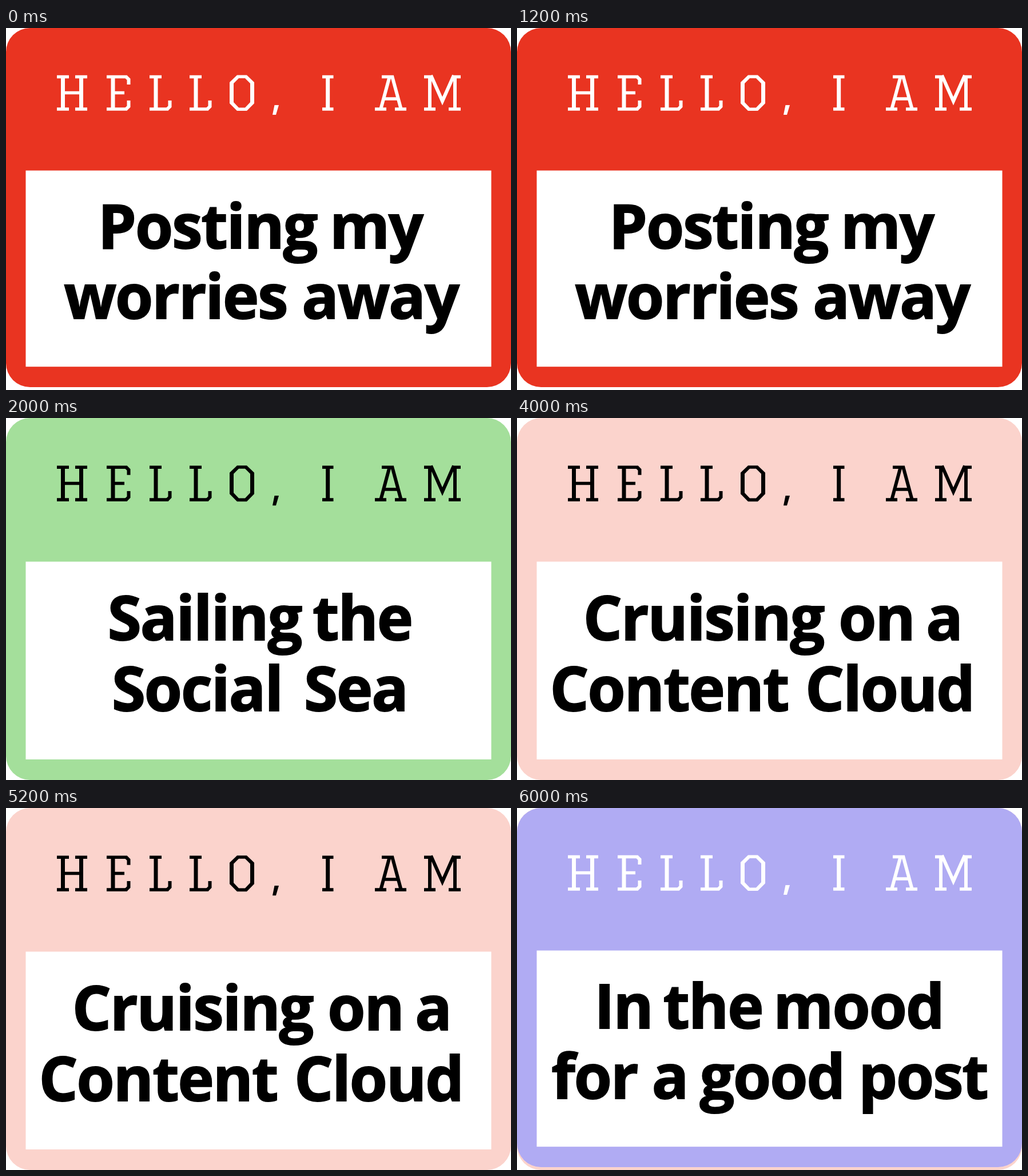
Recreate the animation shown at these times as an HTML page. Size 883 by 634 pixels, loop 8000 ms.

```html
<!DOCTYPE html>
<html lang="en">
<head>
<meta charset="utf-8">
<title>Name tags</title>
<style>
  html, body { margin: 0; width: 100%; height: 100%; overflow: hidden; background: #fff; }
  svg { display: block; width: 100%; height: 100%; }
  #lettering { fill: none; stroke: currentColor; }
  #lettering .solid { fill: currentColor; stroke: none; }
  text {
    font: 700 107px "Open Sans", "Noto Sans", sans-serif;
    letter-spacing: -2px;
    text-anchor: middle;
    stroke: #000;
    stroke-width: 2;
  }
</style>
</head>
<body>
<svg viewBox="0 0 883 634">
  <rect id="under" width="883" height="634" rx="42" fill="#fbd3cc"/>
  <g id="tag">
    <rect id="card" width="883" height="629" rx="42"/>
    <rect x="34.5" y="249.6" width="814" height="343.6" fill="#fff"/>
    <g id="lettering" role="img" aria-label="HELLO, I AM">
      <!-- slabs and bars -->
      <path stroke-width="5.5" d="M89 85.5H110M121 85.5H142M89 142H110M121 142H142M100 113.5H131
        M176 85.5H212M176 142H212M187 113.5H207M251 85.5H272M251 142H284M321 85.5H342M321 142H354
        M553 85.5H572.5M553 142H572.5M657 85.5H678M645 142H665M680 142H700M659 124H687
        M731 85.5H746M780 85.5H795M731 142H751M774 142H795"/>
      <!-- stems -->
      <path stroke-width="7" d="M99.5 84V143M131.5 84V143M187 84V143M262 84V143M332 84V143M562.7 84V143"/>
      <!-- hooks and diagonals -->
      <path stroke-width="6" d="M210 85.5L214.5 90V99M210 142L214.5 137.5V127M282 142L286.5 137.5V127
        M352 142L356.5 137.5V127M671 84L655 143M675 84L691 143M741 84V143M785 84V143M743 83L763 128L783 83"/>
      <path class="solid" fill-rule="evenodd" d="M404 82.5H421L434 95V132L421 145H404L391 132V95Z
        M407 88H418L427 97V130L418 139.5H407L398 130V97Z M469.5 135H477L472 152H466Z"/>
    </g>
    <g id="words"></g>
  </g>
</svg>
<script>
const HOLD = 2000;
const BASELINES = [386, 508.5];
const get = id => document.getElementById(id);

// Each line holds its words with their centres.
const tags = [
  { card: '#e93421', ink: '#fff', stretch: 1, lines: [
    [['Posting', 352], ['my', 647]],
    [['worries', 296.5], ['away', 654]]] },
  { card: '#a4df9b', ink: '#000', stretch: 634 / 629, lines: [
    [['Sailing', 347], ['the', 623]],
    [['Social', 334], ['Sea', 611.5]]] },
  { card: '#fbd3cc', ink: '#000', stretch: 634 / 629, lines: [
    [['Cruising', 326], ['on', 628.5], ['a', 746.5]],
    [['Content', 266], ['Cloud', 651.5]]] },
  { card: '#b0abf3', ink: '#fff', stretch: 1, under: true, lines: [
    [['In', 186], ['the', 342.5], ['mood', 597]],
    [['for', 135.5], ['a', 267], ['good', 446], ['post', 710]]] }
];

function show({ card, ink, stretch, under, lines }) {
  get('card').setAttribute('fill', card);
  get('lettering').style.color = ink;
  get('tag').setAttribute('transform', `scale(1 ${stretch})`);
  get('under').style.display = under ? '' : 'none';
  get('words').innerHTML = lines.flatMap((words, i) =>
    words.map(([word, x]) => `<text x="${x}" y="${BASELINES[i]}">${word}</text>`)).join(' ');
}

let current = 0;
show(tags[current]);

function tick() {
  const next = Math.floor(performance.now() / HOLD) % tags.length;
  if (next !== current) show(tags[current = next]);
  requestAnimationFrame(tick);
}
requestAnimationFrame(tick);
</script>
</body>
</html>
```
